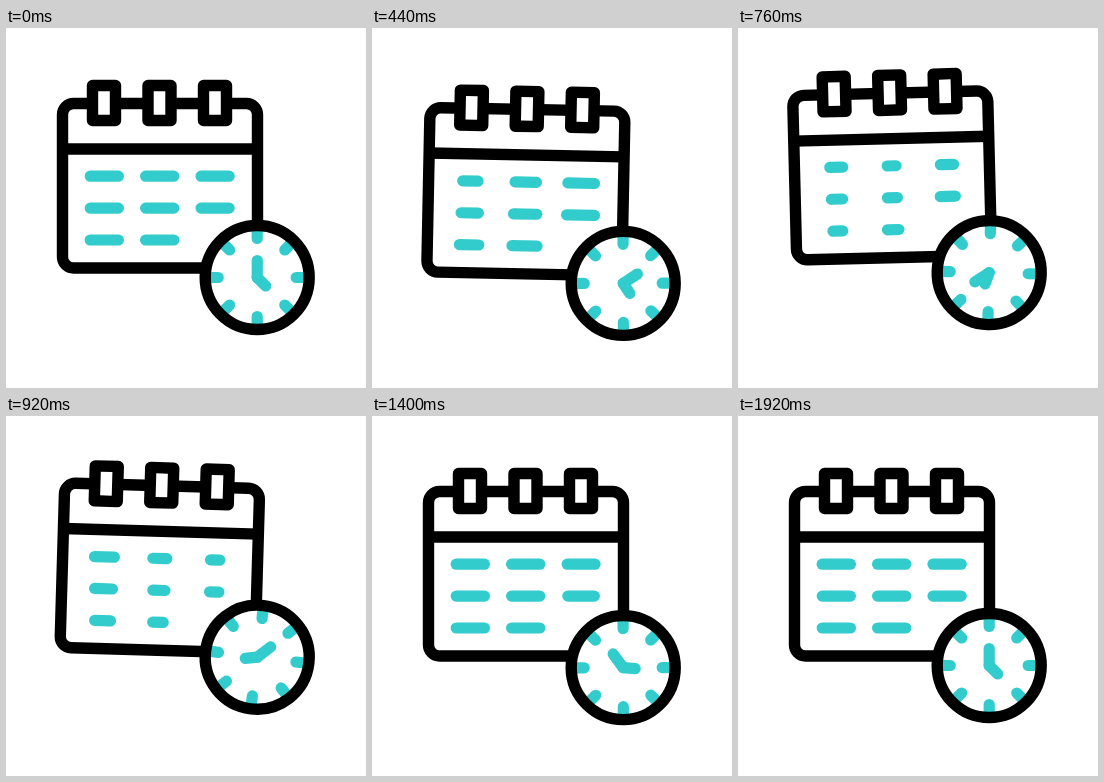
Animation of 360x360 px, one loop 2 s. Source, as an HTML page:

```html
<!DOCTYPE html>
<html lang="en">
<head>
<meta charset="utf-8">
<title>Calendar and clock</title>
<style>
  html, body { margin: 0; width: 100%; height: 100%; overflow: hidden; background: #fff; }
  svg { display: block; width: 100vw; height: 100vh; }

  .outline { fill: #fff; stroke: #000; stroke-width: 11.4; stroke-linejoin: round; }
  .teal { fill: none; stroke: #33cccc; stroke-width: 11.2; stroke-linecap: round; }
  .dash { fill: #33cccc; x: -19.7px; width: 39.4px; }

  .calendar, .clock {
    animation: 2s cubic-bezier(.37, 0, .63, 1) infinite;
  }
  .calendar { transform-origin: 154px 152px; animation-name: sway, bob; }
  .clock { animation-name: rock, bounce; }
  .dash {
    animation: shrink 2s cubic-bezier(.3, .15, .7, .85) infinite;
    animation-delay: calc(var(--i) * 45ms - 2s);
  }

  .minute { animation: two-turns 2s -40ms infinite; }
  .hour { animation: one-turn 2s -1890ms infinite; }

  @keyframes sway {
    0% { rotate: 0deg; }
    13% { rotate: 8deg; }
    30.5% { rotate: -5deg; }
    45% { rotate: 1.7deg; }
    57%, 100% { rotate: 0deg; }
  }
  @keyframes bob {
    0% { translate: 0 0; }
    12% { translate: 0 17.1px; }
    35% { translate: 0 -10.8px; }
    58%, 100% { translate: 0 0; }
  }
  @keyframes rock {
    0% { rotate: 0deg; }
    13% { rotate: 8deg; }
    29.5% { rotate: -6.2deg; }
    45% { rotate: 7.2deg; }
    59.5% { rotate: -2deg; }
    72.5%, 100% { rotate: 0deg; }
  }
  @keyframes bounce {
    0% { translate: 0 0; }
    19% { translate: 0 6px; }
    27% { translate: 0 5.5px; }
    44% { translate: 0 -8.7px; }
    63% { translate: 0 5px; }
    76%, 100% { translate: 0 0; }
  }
  @keyframes shrink {
    0%, 5.5% { x: -19.7px; width: 39.4px; }
    31.5% { x: -10px; width: 20px; }
    57.5%, 100% { x: -19.7px; width: 39.4px; }
  }
  @keyframes two-turns {
    0% { rotate: 0deg; animation-timing-function: cubic-bezier(.65, 0, .35, 1); }
    92%, 100% { rotate: 720deg; }
  }
  @keyframes one-turn {
    0% { rotate: 0deg; animation-timing-function: cubic-bezier(.65, 0, .35, 1); }
    92%, 100% { rotate: 360deg; }
  }
</style>
</head>
<body>
<svg viewBox="0 0 360 360">
  <g class="calendar">
    <rect class="outline" x="56.5" y="75.5" width="195" height="164.5" rx="11"/>
    <path class="outline" d="M56.5 121H251.5"/>
    <g class="outline">
      <rect x="86.5" y="57.5" width="23" height="35"/>
      <rect x="142" y="57.5" width="23" height="35"/>
      <rect x="197.5" y="57.5" width="23" height="35"/>
    </g>
    <g id="dashes"></g>
  </g>
  <g transform="translate(251.2 249.5)">
    <g class="clock">
      <circle r="50" fill="#fff"/>
      <g id="ticks" class="teal"></g>
      <circle class="outline" r="52" style="fill: none"/>
      <path class="teal minute" d="M0 0V-17"/>
      <path class="teal hour" d="M0 0L8.5 8.5"/>
    </g>
  </g>
</svg>
<script>
  const add = (id, tag, attrs) => {
    const node = document.createElementNS("http://www.w3.org/2000/svg", tag);
    for (const key in attrs) node.setAttribute(key, attrs[key]);
    document.getElementById(id).append(node);
  };

  // Eight dashes, numbered down each column; the last cell stays empty.
  for (let i = 0; i < 8; i++) {
    const x = 98.3 + 55.4 * Math.floor(i / 3);
    const y = 148.2 + 31.9 * (i % 3);
    add("dashes", "rect", {
      class: "dash", style: `--i: ${i}`, transform: `translate(${x} ${y})`,
      y: -5.6, height: 11.2, rx: 5.6
    });
  }

  for (let i = 0; i < 8; i++) {
    add("ticks", "path", { d: "M0 -39V-49", transform: `rotate(${i * 45})` });
  }
</script>
</body>
</html>
```
